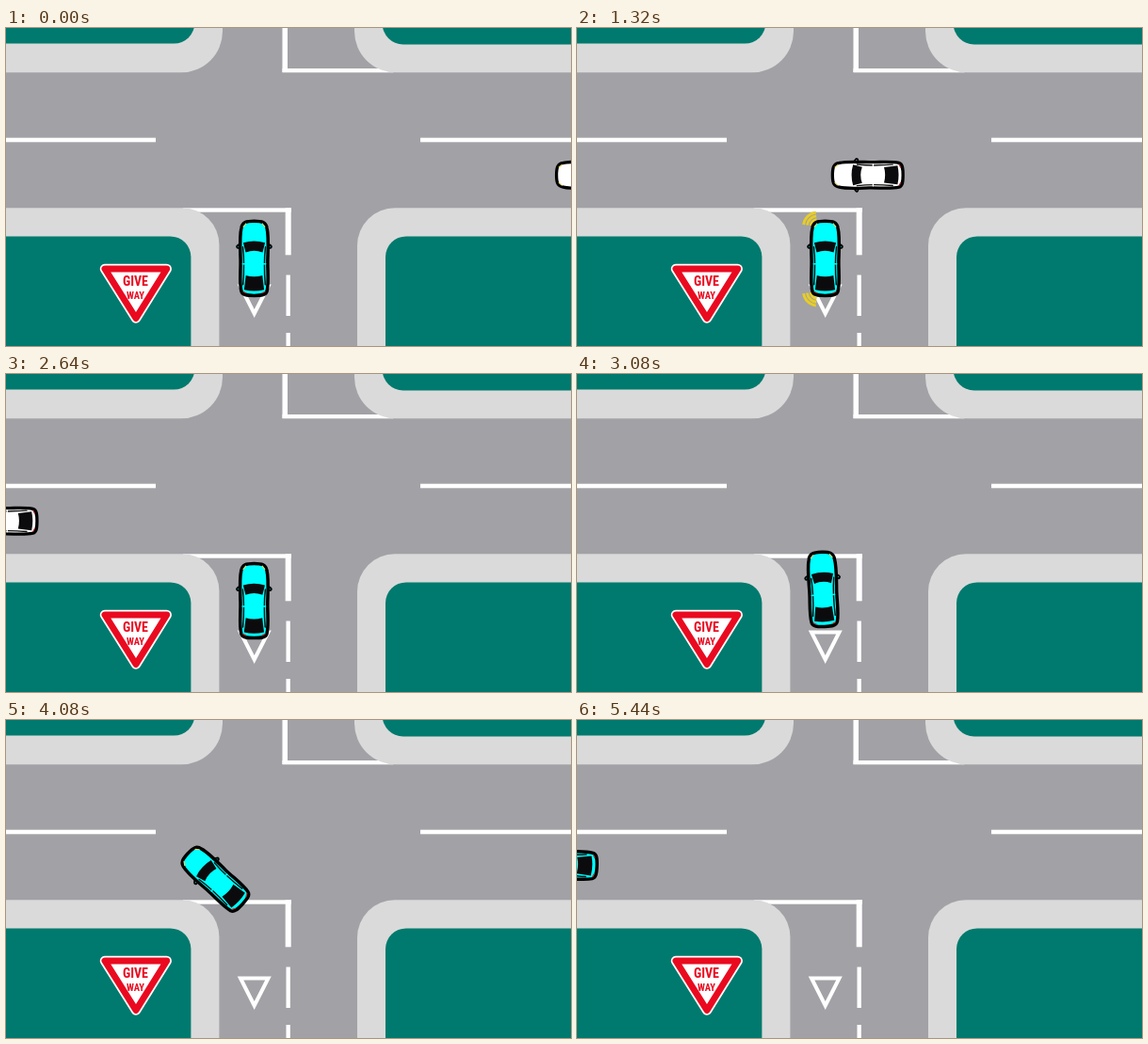
Write an HTML page with a canvas that moves like this. It is 600 by 338 pixels and loops after 5480 ms.

```html
<!DOCTYPE html>
<html lang="en">
<head>
<meta charset="utf-8">
<title>Give way, turning left</title>
<style>
html, body { margin: 0; width: 100%; height: 100%; overflow: hidden; background: #a2a1a6; }
canvas { display: block; width: 600px; height: 338px; }
</style>
</head>
<body>
<canvas id="stage" width="600" height="338"></canvas>
<script>
const ctx = document.getElementById('stage').getContext('2d');
const LOOP = 5480, STEP = 40;
const ROAD = '#a2a1a6', KERB = '#dadada', GRASS = '#007a6e', RED = '#ea0a20';

// time, x, y, heading in degrees (0 points up)
const route = [
  [2440, 263.5, 244.8, 0],
  [2640, 263.4, 241, 0],
  [2800, 263, 238.2, -0.5],
  [3360, 259.2, 219, -5],
  [3480, 258, 214.7, -7],
  [3920, 237, 178, -36],
  [4480, 175, 152, -75],
  [4680, 141.5, 152, -84],
  [5040, 67.5, 153.3, -87],
  [5480, -27, 153.8, -88]
];

function slope(i, k) {
  const a = route[Math.max(i - 1, 0)], b = route[Math.min(i + 1, route.length - 1)];
  return i === 0 ? 0 : (b[k] - a[k]) / (b[0] - a[0]);
}

// smooth cubic through the route points
function pose(t) {
  if (t <= route[0][0]) return route[0].slice(1);
  let i = 0;
  while (i < route.length - 2 && t > route[i + 1][0]) i++;
  const a = route[i], b = route[i + 1], d = b[0] - a[0], u = (t - a[0]) / d;
  const u2 = u * u, u3 = u2 * u;
  return [1, 2, 3].map(k =>
    (2 * u3 - 3 * u2 + 1) * a[k] + (u3 - 2 * u2 + u) * d * slope(i, k) +
    (3 * u2 - 2 * u3) * b[k] + (u3 - u2) * d * slope(i + 1, k));
}

function rect(x, y, w, h, color) {
  ctx.fillStyle = color;
  ctx.fillRect(x, y, w, h);
}

// filled box between two corners with round edges
function rounded(x1, y1, x2, y2, r, color) {
  ctx.beginPath();
  ctx.roundRect(x1, y1, x2 - x1, y2 - y1, r);
  ctx.fillStyle = color;
  ctx.fill();
}

function poly(...pts) {
  ctx.beginPath();
  pts.forEach(p => ctx.lineTo(p[0], p[1]));
  ctx.closePath();
}

function label(text, x, y, size, maxWidth) {
  const face = s => `bold ${s}px "Roboto Condensed", "Open Sans Condensed", "Liberation Sans Narrow", Roboto, sans-serif`;
  ctx.font = face(size);
  while (ctx.measureText(text).width > maxWidth) ctx.font = face(size -= 0.25);
  ctx.fillText(text, x, y);
}

function sign() {
  poly([105, 256], [170.7, 256], [138, 308.5]);
  ctx.lineJoin = 'round';
  ctx.fillStyle = '#fff';
  ctx.fill();
  ctx.strokeStyle = '#fff';
  ctx.lineWidth = 10.5;
  ctx.stroke();
  ctx.strokeStyle = RED;
  ctx.lineWidth = 7;
  ctx.stroke();
  ctx.fillStyle = RED;
  ctx.textAlign = 'center';
  ctx.textBaseline = 'middle';
  label('GIVE', 137.5, 269.7, 17, 27);
  label('WAY', 137.5, 285, 13, 19);
}

function scene() {
  rect(0, 0, 600, 338, ROAD);
  const W = '#fff';
  rect(0, 116.7, 159, 4.6, W);
  rect(440, 116.7, 160, 4.6, W);
  rect(293.5, 0, 5.5, 47, W);
  rect(293.5, 43, 118, 4.3, W);
  rect(188, 191.3, 115, 4.4, W);
  rect(296.7, 191.3, 6, 50, W);
  rect(297.5, 262.5, 4.3, 43.5, W);
  rect(297.5, 324, 4.3, 14, W);

  rounded(-100, -100, 230, 47.3, 44, KERB);
  rounded(-100, -100, 200.3, 16.6, 22, GRASS);
  rounded(370, -100, 700, 47.3, 44, KERB);
  rounded(399.7, -100, 700, 17.4, 22, GRASS);
  rounded(-100, 191.3, 226.4, 500, 39, KERB);
  rounded(-100, 221.4, 196.4, 500, 22, GRASS);
  rounded(373, 191.3, 700, 500, 40, KERB);
  rounded(403, 221.4, 700, 500, 22, GRASS);

  poly([249, 274.5], [278.5, 274.5], [263.7, 303.5]);
  ctx.lineJoin = 'miter';
  ctx.strokeStyle = W;
  ctx.lineWidth = 4;
  ctx.stroke();
  sign();
}

// one side of the bodywork, nose to tail
function flank(s) {
  ctx.moveTo(0, -39.6);
  ctx.bezierCurveTo(s * 8.5, -39.6, s * 12.6, -38.5, s * 13.6, -32);
  ctx.bezierCurveTo(s * 15.6, -24, s * 14.8, -12, s * 14.4, 2);
  ctx.bezierCurveTo(s * 14.2, 14, s * 15.8, 26, s * 13.6, 35);
  ctx.bezierCurveTo(s * 12.5, 39, s * 8, 39.6, 0, 39.6);
}

function pane(y1, w1, y2, w2, bow) {
  ctx.beginPath();
  ctx.moveTo(-w1, y1);
  ctx.quadraticCurveTo(0, y1 - bow, w1, y1);
  ctx.lineTo(w2, y2);
  ctx.quadraticCurveTo(0, y2 - bow, -w2, y2);
  ctx.closePath();
  ctx.fillStyle = '#0b0b0d';
  ctx.fill();
}

function line(x1, y1, x2, y2, color, width) {
  ctx.beginPath();
  ctx.moveTo(x1, y1);
  ctx.lineTo(x2, y2);
  ctx.strokeStyle = color;
  ctx.lineWidth = width;
  ctx.stroke();
}

function signal(y, from, to) {
  ctx.strokeStyle = '#e8cd24';
  ctx.lineWidth = 2.8;
  for (const r of [7.2, 11, 14.8]) {
    ctx.beginPath();
    ctx.arc(-8.2, y, r, from * Math.PI / 180, to * Math.PI / 180);
    ctx.stroke();
  }
}

function car(x, y, deg, paint, scale, blink) {
  ctx.save();
  ctx.translate(x, y);
  ctx.rotate(deg * Math.PI / 180);
  ctx.scale(scale, scale);
  ctx.lineCap = 'butt';
  if (blink) {
    signal(-34, 187, 264);
    signal(35.5, 96, 173);
  }
  ctx.lineJoin = ctx.lineCap = 'round';
  for (const s of [-1, 1]) {
    line(s * 14, -14.5, s * 17, -12.4, '#000', 4.6);
    line(s * 15.5, -13.4, s * 16.8, -12.5, paint, 1);
  }
  ctx.beginPath();
  flank(-1);
  flank(1);
  ctx.fillStyle = paint;
  ctx.fill();
  ctx.strokeStyle = '#000';
  ctx.lineWidth = 3.5;
  ctx.stroke();

  pane(-16.5, 11.6, -6.3, 9, 3.4);
  pane(18.3, 8.8, 33.5, 10.6, -2.4);
  for (const s of [-1, 1]) {
    ctx.beginPath();
    ctx.moveTo(s * 12, -12);
    ctx.quadraticCurveTo(s * 10, 5, s * 11.8, 28);
    ctx.lineWidth = 1.5;
    ctx.strokeStyle = '#111';
    ctx.stroke();
    line(s * 9.8, 6, s * 12.2, 6, paint, 1.5);
    // head and tail lamps
    line(s * 8.8, -36.8, s * 11.4, -33.5, '#e6d36a', 1.2);
    line(s * 8.5, 37, s * 11.6, 35.4, '#a8322c', 1.2);
  }
  ctx.restore();
}

function draw(t) {
  scene();
  car(622 - 0.2373 * t, 156.3, -90, '#fff', 0.945, false);
  const phase = t % 800;
  car(...pose(t), '#00ffff', 1, phase >= 280 && phase < 640);
}

const start = performance.now();
function tick(now) {
  const t = Math.max(0, now - start) % LOOP;
  draw(Math.floor(t / STEP) * STEP);
  requestAnimationFrame(tick);
}
draw(0);
requestAnimationFrame(tick);
</script>
</body>
</html>
```
